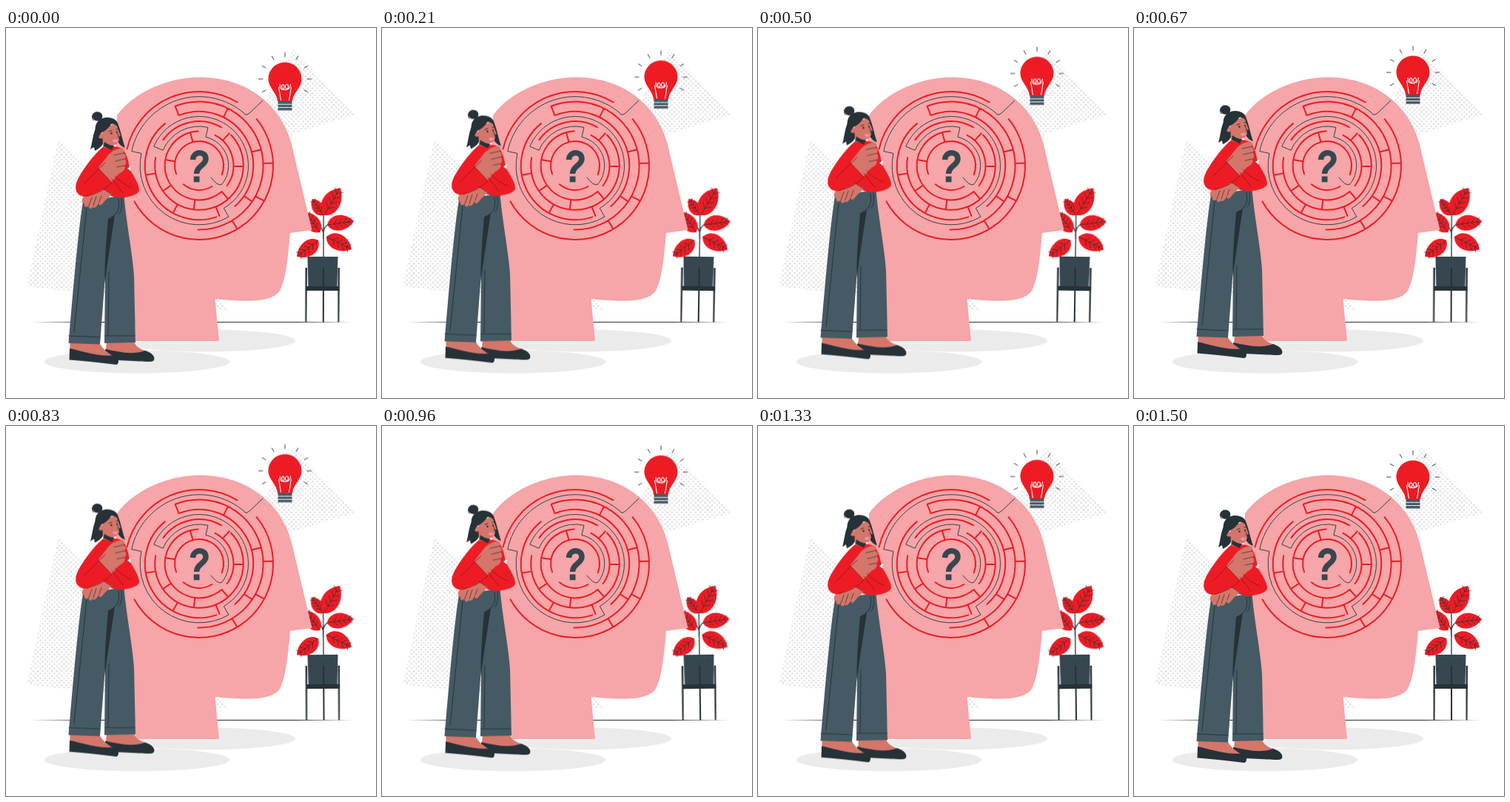
An HTML page for the animation above (1540 ms loop, 500 px wide and 500 px high).

```html
<!DOCTYPE html>
<html lang="en">
<head>
<meta charset="utf-8">
<title>Thinking through the maze</title>
<style>
html, body { margin: 0; width: 100%; height: 100%; overflow: hidden; background: #fff; }
svg { display: block; width: 100vw; height: 100vh; }
.red { fill: #ed1c24; }
.dark { fill: #263238; }
.slate { fill: #37474f; }
.cloth { fill: #455a64; }
.skin { fill: #d4766a; }
.line, .vein, .stem { fill: none; stroke: #263238; stroke-width: .9; stroke-linecap: round; stroke-linejoin: round; }
.vein { stroke-width: .7; vector-effect: non-scaling-stroke; }
.stem { stroke-width: 1.3; }
.wall { fill: none; stroke: #ed1c24; stroke-width: 2; stroke-linecap: round; }
.fold { fill: none; stroke: #8e1218; stroke-width: .8; stroke-linecap: round; }
.float { animation: float 770ms cubic-bezier(.37, 0, .63, 1) -70ms infinite alternate; }
.sway { transform-origin: 431px 307px; animation: sway 770ms cubic-bezier(.37, 0, .63, 1) -415ms infinite alternate; }
@keyframes float { to { transform: translateY(-9px); } }
@keyframes sway { from { transform: rotate(-1deg); } to { transform: rotate(1deg); } }
</style>
</head>
<body>
<svg viewBox="0 0 500 500">
  <defs>
    <pattern id="dots" width="6.4" height="6.4" patternUnits="userSpaceOnUse">
      <g fill="#e0e0e0"><circle cx="1.6" cy="1.6" r="1.3"/><circle cx="4.8" cy="4.8" r="1.3"/></g>
    </pattern>
  </defs>

  <g fill="url(#dots)">
    <path d="M71 149L28 349L302 382Z"/>
    <path d="M388 29L472 117L312 166Z"/>
  </g>
  <path class="dark" d="M33 397.4L110 396.900H390L469 397.4L390 397.900H110Z"/>
  <g fill="#ebebeb">
    <ellipse cx="270" cy="422.5" rx="121" ry="15"/>
    <ellipse cx="177" cy="451" rx="125" ry="15.5"/>
  </g>

  <g class="sway">
    <path class="stem" d="M429 310V253M429 286Q427 268 437 265M429 278Q427 268 420 264"/>
    <g id="leaves"></g>
    <path class="slate" d="M407.500 309H448.500L447.500 351H408.500Z"/>
    <path class="dark" d="M404.500 349H451V355H404.500ZM404.500 324H407L406.500 397.500H404.500ZM448.500 324H451L450.500 397.500H448.500ZM428 324H430V397.500H428Z"/>
  </g>

  <path fill="#f6a5a8" d="M175 423L172 332C166 270 152 240 147 200L150 118C172 88 217 66.500 262 66.500C324 66.500 377 103 389 170L413.500 273L384 277C381 315 377 343 370 355C360 370 330 371 282.500 366L288 423Z"/>
  <path id="walls" class="wall"/>
  <path id="route" class="line"/>
  <path fill="none" stroke="#37474f" stroke-width="7.500" d="M252.500 178C253 166 270 165.500 270 177C270 185 257.500 187 257.500 197"/>
  <path class="slate" d="M253.700 200.500H261.500V208.300H253.700Z"/>

  <g class="float">
    <path class="red" d="M377 46.500C389.500 46.500 399.500 56.500 399.500 69C399.500 81 388 87 387 99H367C366 87 354.500 81 354.500 69C354.500 56.500 364.500 46.500 377 46.500Z"/>
    <g fill="none" stroke="#fff" stroke-width="1.1">
      <path d="M371.500 98L368.500 80M382.500 98L385.500 80"/>
      <path d="M370 76C370 84 376 86 376 80C376 74 371 77 373 81C376 86 382 83 381.500 79C381 74 376 77 378 81C380 85 384 82 384.500 76"/>
    </g>
    <path class="cloth" d="M367.500 99H386.500V102.800H367.500ZM367.500 103.800H386.500V107H367.500ZM367.500 108H386.500V111.500H367.500Z"/>
    <path id="rays" class="line"/>
  </g>

  <g class="float">
    <path class="skin" d="M136 424H173C175 431 182 434 190 437C172 443 150 440 135 435Z"/>
    <path class="dark" d="M134 434C150 437 170 443 188 436C197 439 202 444 200 449C198 452 190 451 180 450.500L150 449L134 442Z"/>
    <path class="skin" d="M86.500 425H126C130 434 138 439 144 443C120 446 100 439 86.500 433Z"/>
    <path class="dark" d="M86 433C100 436 122 444 142 442.500C148 444 152 446 152 449.500C152 453.500 151 455 148 455C126 452 105 450 85.500 448.500Z"/>

    <path class="cloth" d="M104 235L159.500 226C162 260 171 305 173 335L175 425L133 426L134 335L127 427.500L84.500 426C91 350 98 270 104 235Z"/>
    <path class="dark" d="M147 253L138 258C136 285 133 315 133.500 345C138 312 142 285 147 253Z"/>
    <path class="line" d="M85 416L127 418M134 416H174M109 243L92 411M138 415L139 330M152 231Q155 249 146 253M156 230Q158 246 153 251"/>

    <path class="dark" d="M123 132C117 142 117 155 114 164L119 161L120 166C127 163 132 158 133 150Z"/>
    <path class="dark" d="M145 124C154 127 155 145 161 162C152 160 147 148 146 136Z"/>
    <path class="red" d="M131 161C121 168 102 193 96 207C91 219 97 228 107 228L128 224L152 229.500C162 230 178 226 180 220C181 213 172 199 167 191C166 181 163 170 157 163C148 159 139 160 131 161Z"/>
    <path class="skin" d="M130 135L149 129C151 136 153 141 155 146L152 147L153 151C152 157 147 159 142 159L142 164L131 161Z"/>
    <path class="dark" d="M133 154Q139 159 146 159L143 165L132 160Z"/>
    <circle class="skin" cx="128.500" cy="146" r="3.600"/>
    <path class="dark" d="M121 140C119 128 127 121 137 121C146 121 152 126 152 134C148 131 146 129 142 130C138 137 132 140 128 142L123 152Z"/>
    <ellipse class="dark" cx="123.500" cy="119.500" rx="6.800" ry="6.200"/>
    <path class="line" d="M118 125Q113 118 121 114M139 140L143 138.500M149 137L152 136.500M150 142Q154 146 151 147"/>
    <g class="dark"><circle cx="142.500" cy="142.500" r="1.200"/><circle cx="150" cy="140.800" r="1.100"/></g>
    <ellipse fill="#f48fb1" cx="147.500" cy="152.500" rx="3.400" ry="2"/>

    <path class="skin" d="M124 190L138 172C143 166 151 162 158 162.500C161 164 160 168 157 169.500C162 170 163 175 160 177C163 179 163 184 160 186C162 190 159 194 154 196C149 200 147 204 142 209Z"/>
    <path class="vein" d="M146 172L157 169.500M148 180L160 177M150 188L160 186"/>
    <path fill="#fff" d="M164 190L169 186.500L168 193Z"/>
    <path class="skin" d="M104 229Q117 221 131 217L144 225C137 229 133 235 129 239C126 241 125 238 126 235C124 240 120 245 117 242C115 246 111 244 112 240C108 244 105 241 106 237C102 238 102 232 104 229Z"/>
    <path class="vein" d="M112 240L116 229M118 240L122 228M126 235L129 227"/>
    <path class="red" d="M104 228L124 189L143 209L128 220L110 228Z"/>
    <path class="fold" d="M124 189L143 209Q130 223 110 227M134 182L106 210M143 204L158 223M147 200Q158 212 170 216M131 217L144 226"/>
  </g>
</svg>
<script>
const $ = id => document.getElementById(id);
const polar = (cx, cy, r, deg) => {
  const a = deg * Math.PI / 180;
  return `${(cx + r * Math.cos(a)).toFixed(2)} ${(cy + r * Math.sin(a)).toFixed(2)}`;
};

// Bulb rays
let rays = "";
for (let a = 150; a <= 390; a += 30) rays += `M${polar(377, 69, 30, a)}L${polar(377, 69, 35.5, a)}`;
$("rays").setAttribute("d", rays);

// A unit leaf, turned and scaled to run from its base to its tip
let veins = "M0 0H.92";
for (let x = .25; x < .8; x += .18) veins += `M${x} 0l.13 -.15M${x} 0l.13 .15`;
const leaf = (x, y, tipX, tipY) => {
  const turn = Math.atan2(tipY - y, tipX - x) * 180 / Math.PI;
  const size = Math.hypot(tipX - x, tipY - y);
  return `<g transform="translate(${x} ${y}) rotate(${turn}) scale(${size})">
    <path class="red" d="M0 0C.15 -.4 .7 -.4 1 0C.7 .36 .15 .36 0 0Z"/><path class="vein" d="${veins}"/></g>`;
};
$("leaves").innerHTML =
  leaf(430, 253, 451.5, 216) + leaf(429, 253, 413.5, 231) + leaf(434, 266, 470, 261) +
  leaf(424, 276, 405, 249) + leaf(422, 287, 393, 309) + leaf(433, 282, 467, 299);

// Maze, from the outer ring inwards; spokes lead to the next ring
const rings = [
  { from: 193, span: 318, door: -49, spokes: 3, first: -2, step: 30.5 },
  { from: 248, span: 203, door: -168, spokes: 4, first: 248, step: 48.7 },
  { from: 248, span: 343, door: -300, spokes: 3, first: 68, step: 51 },
  { from: 316, span: 344, door: -517, spokes: 5, first: 313, step: 48 },
  { from: 50, span: 346, door: -437, spokes: 2, first: 190, step: 65 },
  { from: 160, span: 330, door: -320, spokes: 0 }
];
const gap = 13.4;
const at = (r, deg) => polar(261, 186, r, deg);
const sweep = (r, a, b) => `A${r} ${r} 0 ${+(Math.abs(b - a) > 180)} ${+(b > a)} ${at(r, b)}`;
const arc = (r, a, b) => b > a ? `M${at(r, a)}${sweep(r, a, b)}` : "";

let walls = "", route = "M347 98L329 115Q326 118 323 117";
rings.forEach(({ from, span, door, spokes, first, step }, i) => {
  const r = 100 - gap * i, end = from + span, half = 6 + 400 / r;
  const mid = from + ((door - from) % 360 + 360) % 360;
  walls += arc(r, from, Math.min(mid - half, end)) + arc(r, mid + half, end);
  for (let k = 0; k < spokes; k++)
    walls += `M${at(r, first + k * step)}L${at(r - gap, first + k * step)}`;
  const next = rings[i + 1];
  if (next) route += `L${at(r - gap / 2, door)}${sweep(r - gap / 2, door, next.door)}`;
});
$("walls").setAttribute("d", walls);
$("route").setAttribute("d", route + "Q286 214 277 202");
</script>
</body>
</html>
```
